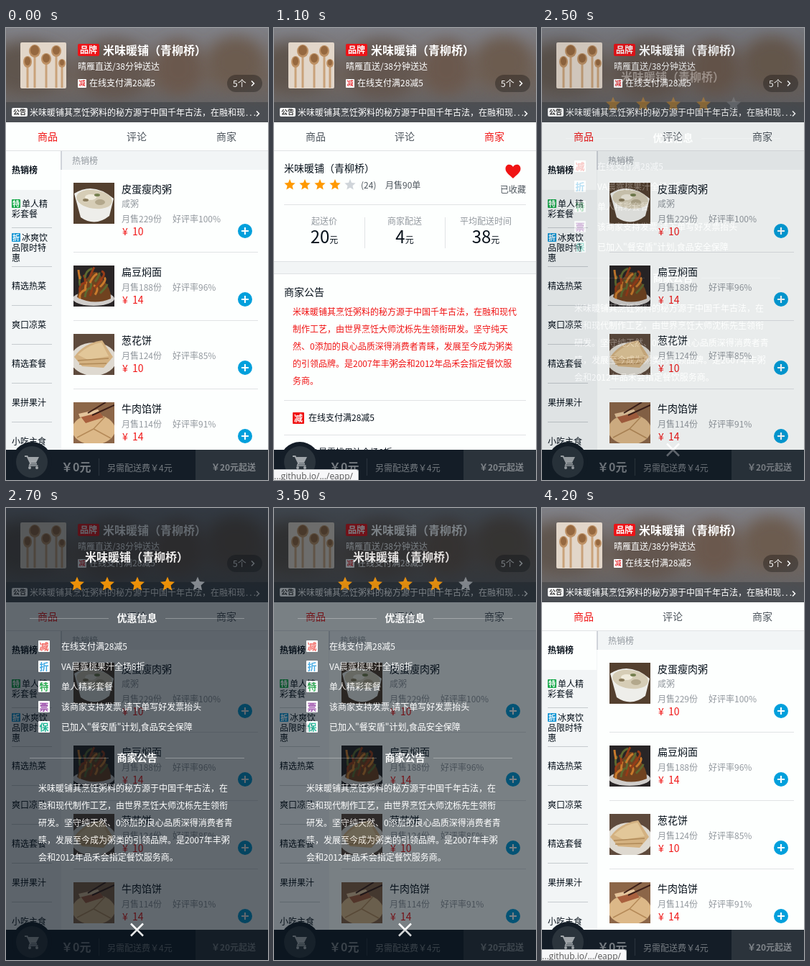
These frames come from a looping animation (365 px wide and 628 px high, 4.3 s). An HTML page:

```html
<!DOCTYPE html>
<html lang="zh-CN">
<head>
<meta charset="utf-8">
<title>外卖商家</title>
<style>
html, body { margin: 0; width: 100%; height: 100%; overflow: hidden; background: #fdfffe; }
svg { display: block; width: 100%; height: 100%; }
text { font-family: "Noto Sans CJK SC", "Noto Sans CJK", "Noto Sans", sans-serif; white-space: pre; }
</style>
</head>
<body>
<svg id="stage" viewBox="0 0 365 628"></svg>
<script>
const INK = '#07111b', GREY = '#93999f', MID = '#4d555d', RED = '#f01414', BLUE = '#00a0dc',
      RULE = '#e1e3e5', PALE = '#f2f5f6', PAGE = '#fdfffe', WHITE = '#fff', GOLD = '#ff9900', DIM = '#757b81';
const SHOP = '米味暖铺（青柳桥）';

const rect = (x, y, w, h, fill, more = '') =>
  `<rect x="${x}" y="${y}" width="${w}" height="${h}" fill="${fill}" ${more}/>`;
const circle = (x, y, r, fill, more = '') => `<circle cx="${x}" cy="${y}" r="${r}" fill="${fill}" ${more}/>`;
const oval = (x, y, rx, ry, fill, more = '') =>
  `<ellipse cx="${x}" cy="${y}" rx="${rx}" ry="${ry}" fill="${fill}" ${more}/>`;
const shape = (d, fill) => `<path d="${d}" fill="${fill}"/>`;
const stroke = (d, color, width, more = '') =>
  `<path d="${d}" fill="none" stroke="${color}" stroke-width="${width}" ${more}/>`;
// y is the middle of the line of text
const text = (x, y, s, size = 12, fill = INK, more = '') =>
  `<text x="${x}" y="${y + size * .38}" font-size="${size}" fill="${fill}" ${more}>${s}</text>`;
const BOLD = 'font-weight="700" ', MEDIUM = 'font-weight="500" ', CENTER = 'text-anchor="middle" ', END = 'text-anchor="end" ';
const group = (id, s) => `<g id="${id}">${s}</g>`;
const each = (list, f) => list.map(f).join('');
const lines = (x, y, step, list, fill, more) => each(list, (s, i) => text(x, y + i * step, s, 12, fill, more));
const tag = (x, y, size, s, back, fore, font) =>
  rect(x, y, size, size, back, 'rx="1"') + text(x + size / 2, y + size / 2, s, font, fore, BOLD + CENTER);

function star(x, y, r, fill) {
  let points = '';
  for (let i = 0; i < 10; i++) {
    const a = i * Math.PI / 5, d = i % 2 ? r * .46 : r;
    points += `${(x + d * Math.sin(a)).toFixed(2)},${(y - d * Math.cos(a)).toFixed(2)} `;
  }
  return `<polygon points="${points}" fill="${fill}"/>`;
}
const stars = (x, y, step, r, off = '#d0d5da') =>
  each([0, 1, 2, 3, 4], i => star(x + i * step, y, r, i < 4 ? GOLD : off));

function header() {
  const spoons = each([[30, 47, 6, 8], [40, 32, 8, 9], [56, 43, 7, 8], [70, 32, 7, 8], [78, 49, 5, 6]],
    ([x, y, rx, ry]) => rect(x - 1.5, y, 3, 83 - y, '#c9a27a') + oval(x, y, rx, ry, '#bd9064') +
      oval(x, y - 1, rx - 2, ry - 2, '#96683f'));
  return rect(0, 0, 365, 131, 'url(#wood)') +
    `<g filter="url(#soft)">` +
      oval(30, 55, 55, 36, '#5f544d') + oval(150, 58, 50, 42, '#63574f') +
      oval(240, 55, 34, 38, '#6a594d') + oval(320, 48, 40, 36, '#6c5b50') +
      oval(190, 120, 230, 14, '#626368') + `</g>` +
    rect(20, 20, 64, 64, '#e2d6c9', 'rx="2"') + spoons +
    rect(100, 22, 30, 17, '#ec1418', 'rx="2"') + text(115, 30.5, '品牌', 12, WHITE, BOLD + CENTER) +
    text(135, 31, SHOP, 16, WHITE, BOLD) +
    text(100, 53.5, '晴雁直送/38分钟送达', 12, WHITE, MEDIUM) +
    tag(100, 71, 12, '减', WHITE, '#e8373b', 9) +
    text(116, 76, '在线支付满28减5', 12, WHITE, MEDIUM) +
    rect(308, 65, 49, 24, 'rgba(0,0,0,.3)', 'rx="12"') + text(316, 77, '5个', 12, WHITE, MEDIUM) +
    stroke('M342 73.5l3.5 3.5-3.5 3.5', WHITE, 1.5) +
    rect(0, 103, 365, 28, 'rgba(7,17,27,.25)') +
    rect(8, 111, 22, 12, WHITE, 'rx="2"') + text(19, 117, '公告', 9, '#333', BOLD + CENTER) +
    text(33, 117, '米味暖铺其烹饪粥料的秘方源于中国千年古法，在融和现', 12, WHITE, MEDIUM) +
    text(334, 117, '...', 12, WHITE, 'letter-spacing="2"') +
    stroke('M349 115.5l3.5 3.5-3.5 3.5', WHITE, 1.5);
}

function porridge() {
  return rect(0, 0, 57, 57, '#54402f') + shape('M1 15Q28-2 56 22L50 46Q30 62 10 48z', '#eeeeea') +
    oval(29, 23, 25, 13, '#d6cdb6', 'transform="rotate(8 29 23)"') + oval(24, 20, 8, 4, '#f0ebdc') +
    oval(37, 27, 7, 4, '#b3a88c') + oval(33, 17, 4, 2, '#75804f') + oval(17, 24, 4, 2, '#8a7c5c');
}

function noodles() {
  const strips = Array.from({ length: 18 }, (_, i) => {
    const x = 9 + i * 7 % 35, y = 46 - i * 1.8;
    return stroke(`M${x} ${y}q${i % 5 * 3 - 2}-10 ${10 - i % 4 * 4}-13`, ['#c97a2c', '#5d6930', '#963c18'][i % 3], 3);
  });
  return rect(0, 0, 57, 57, '#292526') + oval(28, 46, 29, 10, '#d0cdca') +
    shape('M5 44Q8 28 26 10Q35 6 40 18Q53 32 52 46Q28 56 5 44z', '#70421f') + strips.join('');
}

function pancake() {
  return rect(0, 0, 57, 57, '#5e4a3c') + oval(28, 35, 32, 23, '#ded9d0') +
    shape('M1 32Q14 13 40 9L55 32 42 47 12 45z', '#d3b181') + shape('M6 29Q22 14 39 12L49 31 20 36z', '#e2c799') +
    stroke('M6 37L49 34M8 42L46 41', '#b08a58', 1.5);
}

function pie() {
  return rect(0, 0, 57, 57, '#8c6648') + oval(28, 38, 30, 21, '#dcb888') +
    stroke('M28 37L5 49M28 37l24 13M28 37L44 20', '#b58a58', 1.5) +
    shape('M7 16L34 10 42 21 17 29z', '#a9603e') + shape('M7 16L34 10 37 14 9 21z', '#e3c49b') +
    stroke('M45 0L20 15M57 4L26 18', '#3c1f18', 2);
}

const dishes = [porridge, noodles, pancake, pie];

function food([name, sold, rate, price, y, desc], i) {
  const sale = desc ? y + 50 : y + 30, pay = sale + 18;
  return `<svg x="94" y="${y}" width="57" height="57">${dishes[i]()}</svg>` +
    text(161, y + 9, name, 14) + (desc ? text(161, y + 29, desc, 12, GREY) : '') +
    text(161, sale, `月售${sold}份`, 12, GREY) + text(232, sale, `好评率${rate}%`, 12, GREY) +
    text(162, pay, '¥', 14, RED) + text(176, pay, price, 14, RED) +
    circle(333, pay - 1, 10, BLUE) + stroke(`M328 ${pay - 1}h10m-5-5v10`, WHITE, 2);
}

function goods() {
  return rect(0, 171, 77, 415, PALE) + rect(0, 171, 76, 54, PAGE) +
    rect(77, 171, 288, 26, PALE) + rect(76, 171, 2, 26, '#d0d4da') +
    text(92, 184, '热销榜', 12, GREY) + text(8, 197, '热销榜', 12, INK, BOLD) +
    tag(8, 238, 12, '特', '#16a84a', WHITE, 10) + text(22, 244, '单人精') + text(8, 258, '彩套餐') +
    tag(8, 285, 12, '折', '#1296d4', WHITE, 10) + text(22, 291, '冰爽饮') + lines(8, 305, 14, ['品限时特', '惠']) +
    each(['精选热菜', '爽口凉菜', '精选套餐', '果拼果汁', '小吃主食'], (s, i) => text(8, 358.5 + i * 54, s)) +
    each([277, 331, 385, 439, 493, 547], y => rect(8, y, 56, 1, '#c6cbcf')) +
    each([311, 406, 501], y => rect(94, y, 257, 1, RULE)) +
    each([['皮蛋瘦肉粥', 229, 100, 10, 215, '咸粥'], ['扁豆焖面', 188, 96, 14, 330],
          ['葱花饼', 124, 85, 10, 425], ['牛肉馅饼', 114, 91, 14, 520]], food);
}

const split = y => rect(0, y, 365, 18, '#dfe2e4') + rect(0, y + 1, 365, 16, PALE);

function review([user, time, words], i) {
  const y = 422 + i * 108;
  return circle(28, y + 32, 14, '#c3ccd3') + text(54, y + 24, user) + text(351, y + 24, time, 12, GREY, END) +
    stars(59, y + 42, 13, 5) + text(54, y + 64, words) + circle(60, y + 86, 5, BLUE) +
    text(72, y + 86, '推荐', 12, GREY) + rect(14, y + 107, 337, 1, RULE);
}

function ratings() {
  return text(68, 203, '4.2', 24, GOLD, CENTER) + text(68, 229, '综合评分', 12, INK, CENTER) +
    text(68, 253, '高于周边商家69.2%', 12, GREY, CENTER) + rect(137, 189, 1, 82, RULE) +
    each([['服务态度', '4.1'], ['商品评分', '4.3']], ([s, n], i) =>
      text(161, 202 + i * 26, s) + stars(228, 202 + i * 26, 21, 8) + text(332, 202 + i * 26, n, 12, GOLD)) +
    text(161, 254, '送达时间') + text(221, 254, '38分钟', 12, GREY) + split(288) +
    each([['全部 24', 14, 66, BLUE, WHITE], ['满意 18', 88, 66, '#ccecf8', MID], ['不满意 6', 162, 72, '#dbdddf', MID]],
      ([s, x, w, back, fore]) => rect(x, 323, w, 32, back, 'rx="1"') + text(x + w / 2, 339, s, 12, fore, CENTER)) +
    rect(14, 373, 337, 1, RULE) + circle(26, 397, 11, '#c3c7cb') + stroke('M21 397l4 4 7-8', WHITE, 2) +
    text(42, 397, '只看有内容的评价', 12, GREY) + rect(0, 421, 365, 1, RULE) +
    each([['5******k', '2016-07-23 21:52', '不错,粥很好喝,我经常吃这一家,非常赞'],
          ['8******m', '2016-07-23 20:18', '服务态度不错']], review);
}

function seller() {
  return text(14, 195, SHOP, 14) + stars(22, 218, 21, 8) + text(121, 218, '(24)', 12, MID) +
    text(155, 218, '月售90单', 12, MID) +
    shape('M333 209C328 204 322.5 201 322.5 195.5C322.5 189 330 188 333 193C336 188 343.5 189 343.5 195.5C343.5 201 338 204 333 209z', RED) +
    text(333, 224, '已收藏', 12, MID, CENTER) + rect(14, 245, 337, 1, RULE) +
    each([['起送价', 20, 70], ['商家配送', 4, 182], ['平均配送时间', 38, 295]], ([s, n, x]) =>
      text(x, 268, s, 12, GREY, CENTER) +
      text(x, 290, `${n}<tspan font-size="12">元</tspan>`, 24, INK, CENTER + 'font-weight="300"')) +
    rect(126, 263, 1, 43, RULE) + rect(238, 263, 1, 43, RULE) + split(324) +
    text(14, 367, '商家公告', 14) +
    lines(26, 394, 24, ['米味暖铺其烹饪粥料的秘方源于中国千年古法，在融和现代',
      '制作工艺，由世界烹饪大师沈栎先生领衔研发。坚守纯天',
      '然、0添加的良心品质深得消费者青睐，发展至今成为粥类',
      '的引领品牌。是2007年丰粥会和2012年品禾会指定餐饮服', '务商。'], RED) +
    rect(14, 517, 337, 1, RULE) + tag(26, 534, 16, '减', RED, WHITE, 12) + text(48, 541.5, '在线支付满28减5') +
    rect(14, 565, 337, 1, RULE) + tag(26, 582, 16, '折', BLUE, WHITE, 12) + text(48, 589, 'VA晨露桃果汁全场8折');
}

function cart() {
  const icon = '#a0a5a9';
  return rect(0, 586, 365, 42, '#141d27') + circle(36, 603, 28, '#141d27') + circle(36, 603, 22, '#2b343c') +
    stroke('M26 595h3.5l5 10.5h8.5', icon, 2) + shape('M30 596h16l-4 8h-8z', icon) +
    circle(33, 611, 2, icon) + circle(43, 611, 2, icon) + stroke('M34 604l-1.5 4h12', icon, 1.5) +
    text(77, 610, '￥0元', 16, DIM, BOLD) + rect(129, 598, 1, 24, '#2c353d') +
    text(141, 611, '另需配送费￥4元', 12, DIM) +
    rect(264, 586, 101, 42, '#2b333b') + text(317, 610, '￥20元起送', 12, '#81868b', BOLD + CENTER);
}

const heading = (y, s) => rect(33, y, 110, 1, 'rgba(255,255,255,.3)') + rect(222, y, 110, 1, 'rgba(255,255,255,.3)') +
  text(182.5, y, s, 14, WHITE, BOLD + CENTER);

function detail() {
  return rect(0, 0, 365, 628, INK, 'id="shade"') + text(182, 68, SHOP, 16, WHITE, BOLD + CENTER) +
    stars(99, 106, 42, 10.5, '#8b9197') + heading(153, '优惠信息') + heading(347, '商家公告') +
    each([['减', '#f0504a', '在线支付满28减5'], ['折', '#2b9fe0', 'VA晨露桃果汁全场8折'], ['特', '#22b04c', '单人精彩套餐'],
          ['票', '#8a2a9c', '该商家支持发票,请下单写好发票抬头'], ['保', '#10b894', '已加入"餐安盾"计划,食品安全保障']],
      ([c, color, s], i) => tag(45, 184 + i * 28, 16, c, WHITE, color, 13) + text(77, 192 + i * 28, s, 12, WHITE, MEDIUM)) +
    lines(45, 389.5, 24, ['米味暖铺其烹饪粥料的秘方源于中国千年古法，在', '融和现代制作工艺，由世界烹饪大师沈栎先生领衔',
      '研发。坚守纯天然、0添加的良心品质深得消费者青', '睐，发展至今成为粥类的引领品牌。是2007年丰粥',
      '会和2012年品禾会指定餐饮服务商。'], WHITE, MEDIUM) +
    stroke('M174 577.5l17 17m0-17l-17 17', WHITE, 2.5);
}

const statusBar = () =>
  `<path d="M-1 629V613.5H114.5q3 0 3 3V629z" fill="#f7f7f9" stroke="#b4b8bb"/>` +
  text(0, 622.5, '...github.io/.../eapp/', 12, '#555', 'style="font-family:\'Open Sans\',sans-serif"');

const $ = id => document.getElementById(id);
const pages = ['goods', 'ratings', 'seller'];
$('stage').innerHTML =
  `<defs><linearGradient id="wood" x2="0" y2="1"><stop stop-color="#7f8087"/><stop offset=".5" stop-color="#70655e"/>
   <stop offset="1" stop-color="#616266"/></linearGradient>
   <filter id="soft"><feGaussianBlur stdDeviation="10"/></filter>
   <clipPath id="head"><rect width="365" height="131"/></clipPath></defs>` +
  rect(0, 0, 365, 628, PAGE) + `<g clip-path="url(#head)">${header()}</g>` +
  each(['商品', '评论', '商家'], (s, i) => text([58, 182, 307][i], 151, s, 14, MID, `${CENTER} id="tab${i}"`)) +
  rect(0, 170, 365, 1, RULE) +
  group('goods', goods()) + group('ratings', ratings()) + group('seller', seller()) +
  cart() + group('detail', detail()) + group('status', statusBar());

// The CSS "ease" curve
function ease(x) {
  if (x <= 0) return 0;
  if (x >= 1) return 1;
  const bez = (a, b, u) => 3 * a * u * (1 - u) ** 2 + 3 * b * u * u * (1 - u) + u ** 3;
  let lo = 0, hi = 1;
  for (let i = 0; i < 20; i++) {
    const mid = (lo + hi) / 2;
    if (bez(.25, .25, mid) < x) lo = mid; else hi = mid;
  }
  return bez(.1, 1, lo);
}

const show = (id, on) => $(id).style.display = on ? '' : 'none';

function draw(now) {
  const t = Math.floor(now % 4300 / 100) * 100;
  const page = t < 600 || t >= 1800 ? 0 : t < 1100 ? 1 : 2;
  pages.forEach((id, i) => {
    show(id, i == page);
    $('tab' + i).setAttribute('fill', i == page ? RED : MID);
  });
  show('status', t >= 500 && t < 2300 || t >= 4200);
  const p = ease((t - 2395) / 500) - ease((t - 3425) / 500);
  show('detail', p > 0);
  $('detail').setAttribute('opacity', p);
  $('shade').setAttribute('opacity', .8 * p);
}

const start = performance.now();
function tick() {
  draw(performance.now() - start);
  requestAnimationFrame(tick);
}
tick();
</script>
</body>
</html>
```
